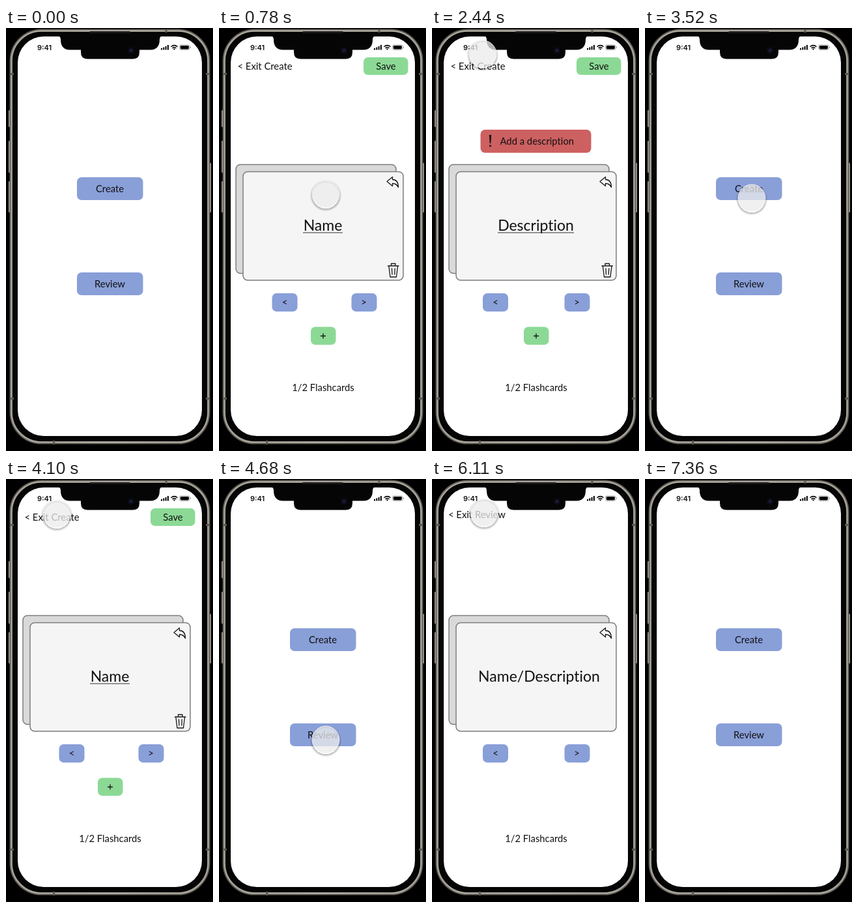
An HTML page that plays this animation: 318 by 649 pixels, repeating every 7460 ms.

```html
<!DOCTYPE html>
<html lang="en">
<head>
<meta charset="utf-8">
<title>Flashcard app prototype</title>
<style>
html, body { margin: 0; width: 100%; height: 100%; overflow: hidden; background: #000; }
svg { display: block; width: 100vw; height: 100vh; }
text { font: 14.8px Lato, "Open Sans", sans-serif; font-variant-ligatures: none; fill: #111; }
.mid { text-anchor: middle; }
.big { font-size: 23px; }
.clock { font: 600 11px Inter, Roboto, sans-serif; }
.blue { fill: #899fd8; }
.green { fill: #8cd996; }
.red { fill: #cd6061; }
.card { stroke: #7d7d7d; stroke-width: 1.5; }
.icon { fill: none; stroke: #161616; stroke-width: 1.3; stroke-linejoin: round; stroke-linecap: round; }
.rule { stroke: #333; stroke-width: 1; }

#home, #create, #name, #desc, #review, #nameAlert, #descAlert { animation: 7460ms step-end infinite; }
#home { animation-name: home; }
#create { animation-name: create; }
#name { animation-name: name; }
#desc { animation-name: desc; }
#review { animation-name: review; }
#nameAlert { animation-name: nameAlert; }
#descAlert { animation-name: descAlert; }
#touch {
  animation: move 7460ms ease-in-out infinite, show 7460ms step-end infinite;
}

@keyframes home {
  0%, 36.73%, 56.84%, 85.79%, 100% { opacity: 1; }
  10.46%, 48.53%, 69.57% { opacity: 0; }
}
@keyframes create {
  0%, 36.73%, 56.84%, 100% { opacity: 0; }
  10.46%, 48.53% { opacity: 1; }
}
@keyframes name {
  0%, 36.73%, 100% { opacity: 1; }
  22.52% { opacity: 0; }
}
@keyframes desc {
  0%, 36.73%, 100% { opacity: 0; }
  22.52% { opacity: 1; }
}
@keyframes review {
  0%, 85.79%, 100% { opacity: 0; }
  69.57% { opacity: 1; }
}
@keyframes nameAlert {
  0%, 22.52%, 100% { opacity: 0; }
  15.68% { opacity: 1; }
}
@keyframes descAlert {
  0%, 36.73%, 100% { opacity: 0; }
  28.95% { opacity: 1; }
}
@keyframes show {
  0%, 92.49%, 100% { opacity: 0; }
  2.68% { opacity: 1; }
}
@keyframes move {
  0%, 2.68% { transform: translate(235px, 590px); }
  8.04%, 11.5% { transform: translate(164px, 255px); }
  14.48%, 16.09% { transform: translate(256px, 62px); }
  19.71%, 22.79% { transform: translate(266px, 245px); }
  26.27%, 28.95% { transform: translate(256px, 62px); }
  32.71% { transform: translate(78px, 40px); }
  34.05%, 39.28% { transform: translate(78px, 54px); }
  45.84%, 48.53% { transform: translate(164px, 261px); }
  53.62%, 58.98% { transform: translate(78px, 54px); }
  62.73%, 71.85% { transform: translate(164px, 400px); }
  75.34%, 77.08% { transform: translate(266px, 243px); }
  80.56%, 88.61% { transform: translate(80px, 52px); }
  92.49%, 100% { transform: translate(235px, 590px); }
}
</style>
</head>
<body>
<svg viewBox="0 0 318 649" preserveAspectRatio="none">
  <defs>
    <linearGradient id="metal" x1="0" x2="1" y1="0" y2="0">
      <stop offset="0" stop-color="#a5a197"/>
      <stop offset=".5" stop-color="#b9b5ac"/>
      <stop offset="1" stop-color="#a5a197"/>
    </linearGradient>
    <radialGradient id="shade">
      <stop offset=".82" stop-opacity="0"/>
      <stop offset=".83" stop-opacity=".28"/>
      <stop offset="1" stop-opacity="0"/>
    </radialGradient>
    <g id="cards">
      <rect class="card" x="26" y="209.5" width="246" height="167" rx="7" fill="#d9d9d9"/>
      <rect class="card" x="37" y="220.5" width="246" height="166.500" rx="7" fill="#f5f5f5"/>
      <path class="icon" d="M258 235.500L266.500 228.500V232.500C272 232.500 275.500 236.500 275.500 244.500C273.500 240 271 238.500 266.500 238.500V242.500Z"/>
    </g>
    <g id="prev">
      <rect class="blue" x="78" y="407" width="39" height="28" rx="7"/>
      <text class="mid" x="97.500" y="426">&lt;</text>
    </g>
    <g id="next">
      <rect class="blue" x="203.500" y="407" width="39" height="28" rx="7"/>
      <text class="mid" x="222.500" y="426">&gt;</text>
    </g>
    <g id="bin" class="icon">
      <path d="M261 365H277.500M266 364V361.500H272.500V364M262.500 366L264.500 382H274L276 366M267 369L267.500 378M271.800 369L271.300 378"/>
    </g>
    <path id="bang" d="M-1.700 0H1.700L.8 13H-.8ZM-1.300 15.500H1.300V18.300H-1.300Z" fill="#151515"/>
  </defs>

  <rect width="318" height="649"/>

  <!-- phone body -->
  <g fill="#aaa69c">
    <rect x="4" y="126" width="3" height="26" rx="1"/>
    <rect x="4" y="173" width="3" height="49" rx="1"/>
    <rect x="4" y="235" width="3" height="48" rx="1"/>
    <rect x="312" y="207" width="3" height="76" rx="1"/>
  </g>
  <rect x="7.500" y="3.500" width="304" height="633" rx="47" fill="#050505" stroke="#5d5a54" stroke-width="4"/>
  <rect x="8.500" y="4.500" width="302" height="631" rx="46" fill="none" stroke="url(#metal)" stroke-width="2.600"/>
  <path d="M6 70.500H12M307 70.500H313M6 568.500H12M307 568.500H313M246 2V7M73.500 633V639" stroke="#5b5851" stroke-width="3"/>
  <rect x="18" y="13" width="283" height="613" rx="40" fill="#fff"/>

  <g id="home">
    <rect class="blue" x="109" y="229" width="101.500" height="35" rx="7"/>
    <text class="mid" x="159.500" y="251.500">Create</text>
    <rect class="blue" x="109" y="375" width="101.500" height="35" rx="7"/>
    <text class="mid" x="159.500" y="397.500">Review</text>
  </g>

  <g id="create">
    <text x="28.500" y="64">&lt; Exit Create</text>
    <rect class="green" x="222" y="45" width="68.500" height="27" rx="7"/>
    <text class="mid" x="256.500" y="64">Save</text>
    <use href="#cards"/>
    <use href="#next"/>
    <rect class="green" x="141" y="458.500" width="38.500" height="27.500" rx="7"/>
    <path class="icon" d="M156.500 472.500H163.500M160 469V476"/>
    <text class="mid" x="160" y="556.500">1/2 Flashcards</text>
    <g id="name">
      <g id="nameAlert">
        <rect class="red" x="92" y="158.500" width="144.500" height="35" rx="7"/>
        <use href="#bang" x="111.500" y="167"/>
        <text x="124" y="181">Add a name</text>
      </g>
      <text class="mid big" x="159.500" y="311">Name</text>
      <path class="rule" d="M129 314H190"/>
      <use href="#bin" x="-1.500"/>
      <use href="#prev" x="3.500"/>
    </g>
    <g id="desc">
      <g id="descAlert">
        <rect class="red" x="74.500" y="156" width="170" height="35.500" rx="7"/>
        <use href="#bang" x="89.500" y="164"/>
        <text x="104.500" y="179">Add a description</text>
      </g>
      <text class="mid big" x="159.500" y="311">Description</text>
      <path class="rule" d="M101 314H218"/>
      <use href="#bin"/>
      <use href="#prev"/>
    </g>
  </g>

  <g id="review">
    <text x="25" y="59.500">&lt; Exit Review</text>
    <use href="#cards"/>
    <text class="mid big" x="164.500" y="311">Name/Description</text>
    <use href="#prev"/>
    <use href="#next"/>
    <text class="mid" x="160" y="556.500">1/2 Flashcards</text>
  </g>

  <!-- status bar -->
  <text class="clock" x="48" y="34">9:41</text>
  <path d="M238 31h2v2.500h-2zM241.300 29.500h2v4h-2zM244.600 28h2v5.500h-2zM247.900 26h2v7.500h-2z"/>
  <path d="M253.500 28.700Q258.500 24.500 263.500 28.700M255.500 30.900Q258.500 28.500 261.500 30.900" fill="none" stroke="#000" stroke-width="1.500"/>
  <path d="M256.800 32L258.500 33.800L260.200 32Q258.500 30.800 256.800 32Z"/>
  <rect x="266.500" y="25.800" width="15.500" height="7.800" rx="2.300" fill="none" stroke="#999" stroke-width=".8"/>
  <rect x="267.800" y="27" width="13" height="5.400" rx="1.300"/>
  <path d="M283.300 28.500V31" stroke="#999"/>

  <!-- notch -->
  <path fill="#050505" d="M80 12Q84 13 84 18C84 28 89 33.500 98 33.500H115V37Q115 47.500 125 47.500H195Q205 47.500 205 37V33.500H222C231 33.500 236 28 236 18Q236 13 240 12Z"/>
  <rect x="128" y="5" width="63" height="3" rx="1.500" fill="#1b1b1b"/>
  <circle cx="192" cy="34.500" r="5" fill="#0c0d18"/>
  <circle cx="192" cy="34.500" r="2" fill="#1d2142"/>

  <g id="touch">
    <circle cy="2" r="24.500" fill="url(#shade)"/>
    <circle r="21" fill="#ebebed" fill-opacity=".76" stroke="#fff" stroke-opacity=".75"/>
  </g>
</svg>
</body>
</html>
```
